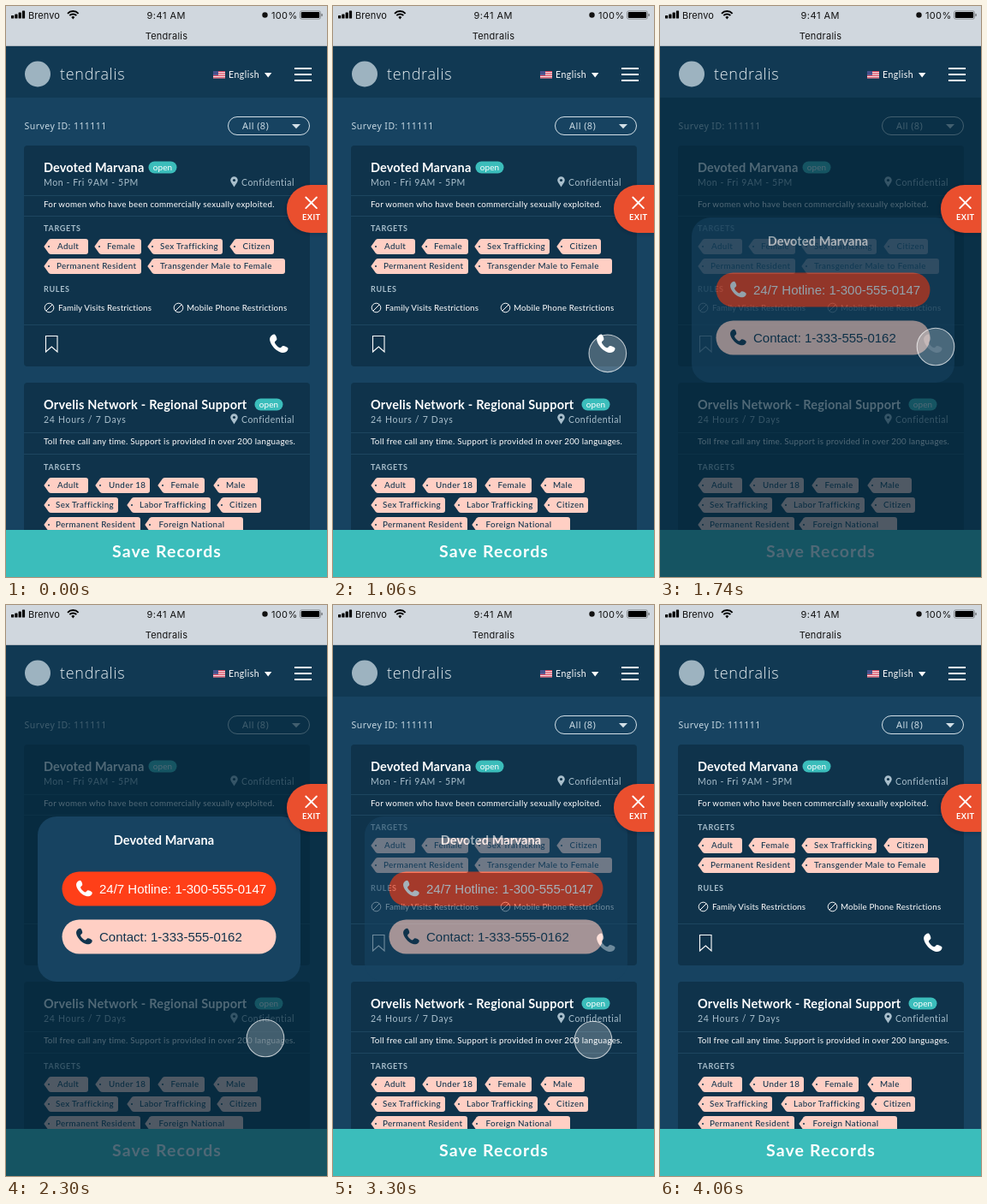
Animation, 375 px wide and 667 px high, one loop 4620 ms. Source, as an HTML page:

```html
<!DOCTYPE html>
<html lang="en">
<head>
<meta charset="utf-8">
<title>Survey results</title>
<style>
  html, body { margin: 0; width: 100%; height: 100%; overflow: hidden; background: #174361; }
  svg { display: block; width: 100vw; height: 100vh; }
  text { font-family: Lato, "Open Sans", sans-serif; white-space: pre; }
  .sys { font-family: Inter, Roboto, sans-serif; }
  .noto { font-family: "Noto Sans", "Open Sans", sans-serif; }
  .thin { font-family: "Open Sans", "Noto Sans", sans-serif; font-weight: 300; }
  .arial { font-family: "Liberation Sans", Arial, sans-serif; }
  .medium { font-weight: 500; }
  .bold { font-weight: 700; }
  .mid { text-anchor: middle; }
</style>
</head>
<body>
<svg id="stage" viewBox="0 0 375 667" xmlns="http://www.w3.org/2000/svg"></svg>
<script>
const LOOP = 4620;
const C = {
  page: '#174361', head: '#113953', card: '#0f334b', line: '#1d465f', navy: '#12344d', dim: '#05293c',
  teal: '#3bbdbb', tag: '#ffcfc4', red: '#ff3f18', exit: '#ea4f2e', soft: '#a9bfcc', bar: '#d0d7de'
};

// ---- drawing helpers ----
const text = (s, x, y, size, gap = 0, fill = '#fff', cls = '') =>
  `<text x="${x}" y="${y}" font-size="${size}" letter-spacing="${gap}" fill="${fill}" class="${cls}">${s}</text>`;
const rect = (x, y, w, h, fill, r = 0, more = '') =>
  `<rect x="${x}" y="${y}" width="${w}" height="${h}" rx="${r}" fill="${fill}" ${more}/>`;
const path = (d, fill, more = '') => `<path d="${d}" fill="${fill}" ${more}/>`;
const stroke = (d, color, w, more = '') =>
  path(d, 'none', `stroke="${color}" stroke-width="${w}" ${more}`);
const disc = (x, y, r, fill) => `<circle cx="${x}" cy="${y}" r="${r}" fill="${fill}"/>`;
const rule = y => rect(21, y, 334, 1, C.line);

const title = (s, x, y, gap, cls = '') => text(s, x, y, 14.5, gap, '#fff', 'bold ' + cls);
const label = (s, y) => text(s, 44, y, 9, 0.7, C.soft, 'bold');
const badge = (x, y) => rect(x - 0.5, y - 0.5, 33, 14, C.teal, 7) +
  text('open', x + 16, y + 9.6, 10, 0.1, '#fff', 'mid');

const tag = (s, x, right, textX, cy) =>
  path(`M${x - 0.7} ${cy}L${x + 4.8} ${cy - 7.8}Q${x + 5.8} ${cy - 9} ${x + 8} ${cy - 9}H${right - 3}q3 0 3 3v12q0 3-3 3` +
    `H${x + 8}Q${x + 5.8} ${cy + 9} ${x + 4.8} ${cy + 7.8}Z`, C.tag) +
  disc(x + 5, cy, 1, C.navy) + text(s, textX, cy + 3.4, 9.8, 0.36, C.navy, 'medium');

const phone = (x, y, k, fill) => path(
  'M1.2 4.2C2.6 1.6 5 .2 6.6 .6C8.4 1.6 9.8 5.6 9.4 7.2C9 8.6 6.8 9.2 6.8 10.6C7.4 13 11 16.8 13.6 17.4' +
  'C15 17.4 15.6 15.2 17 14.8C18.8 14.6 22.6 16.4 23.4 17.8C23.8 19.6 22.2 22 19.8 23' +
  'C15 24.6 8 20.4 4.6 15.6C1.4 11.4-.2 7 1.2 4.2Z', fill, `transform="translate(${x} ${y}) scale(${k})"`);

const place = y =>
  path(`M266.5 ${y + 6}C264 ${y + 2} 262.2 ${y} 262.2 ${y - 2}a4.3 4.3 0 0 1 8.6 0C270.8 ${y} 269 ${y + 2} 266.5 ${y + 6}Z`, C.soft) +
  disc(266.5, y - 2, 1.6, C.card) + text('Confidential', 275, y + 4.5, 10.5, 0.5, C.soft);

const banned = x => `<circle cx="${x}" cy="352.5" r="5.3" fill="none" stroke="#fff"/>` +
  stroke(`M${x - 3.6} 356.1l7.2-7.2`, '#fff', 1);

const callButton = (s, y, fill, ink) => rect(65.5, y, 250, 40, fill, 20) +
  phone(81.5, y + 9.7, 0.82, ink) + text(s, 109, y + 25.4, 15, 0, ink, 'arial');

// ---- parts of the screen ----
function statusBar() {
  const bars = [3.5, 5, 7, 9].map((h, i) => rect(6 + i * 4.3, 14.5 - h, 3.2, h, '#000', 0.6)).join('');
  const wifi = stroke('M72 8.8a8.6 8.6 0 0 1 12.6 0M74.3 11.2a5.4 5.4 0 0 1 8 0', '#000', 1.9) +
    path('M78.3 15.4l-2-2.3a2.8 2.8 0 0 1 4 0Z', '#000');
  const battery = rect(343.5, 5.8, 24, 9.4, 'none', 2, 'stroke="#000" stroke-opacity=".45" stroke-width=".7"') +
    rect(344.8, 7, 21.4, 7, '#000', 1) + rect(368.4, 9, 1.3, 3, '#000', 0.6, 'fill-opacity=".5"');
  return rect(0, 0, 375, 47, C.bar) + rect(0, 46.5, 375, 0.5, '#8d969e') + bars + wifi + battery +
    disc(302.5, 10.5, 3.2, '#111') +
    text('Brenvo', 26, 15, 11, 0.1, '#111', 'sys') +
    text('9:41 AM', 187.3, 15, 11, 0.5, '#111', 'sys mid') +
    text('100%', 310, 15, 11, 0.35, '#111', 'sys') +
    text('Tendralis', 187.5, 39, 11, 0.25, '#111', 'sys mid');
}

function header() {
  let flag = rect(242, 76, 14, 8.4, '#f3e9ec');
  for (let i = 0; i < 4; i++) flag += rect(242, 76 + i * 2.4, 14, 1.2, '#d9435a');
  flag += rect(242, 76, 6, 4.8, '#46508c');
  const menu = [73, 80, 87].map(y => rect(337, y - 1, 20, 2, '#fff')).join('');
  return rect(0, 47, 375, 60, C.head) + disc(37, 79.5, 15, '#9db3c0') +
    text('tendralis', 63, 86, 18, 0.7, '#e6eef2', 'thin') + flag +
    text('English', 260, 84, 10.5, 0.5) + path('M302 78h8.4l-4.2 5.4Z', '#fff') + menu;
}

function filters() {
  return text('Survey ID: 111111', 21.5, 144, 10.5, 0.45, '#c6d8e2', 'noto medium') +
    rect(259.5, 129.5, 95, 21, 'none', 10.5, 'stroke="#d3e0e7"') +
    text('All (8)', 276, 144, 11, 0.4, '#c9d9e2', 'noto') + path('M334 138h10l-5 5.2Z', '#d3e0e7');
}

function firstCard() {
  return rect(21, 163, 334, 258, C.card, 4) + rule(221) + rule(245) + rule(372) +
    title('Devoted Marvana', 44, 194, 0.12) + badge(167, 182) +
    text('Mon - Fri 9AM - 5PM', 44, 210, 10.5, 0.6, C.soft) + place(205.5) +
    text('For women who have been commercially sexually exploited.', 44, 235, 9.8, 0.25) +
    label('TARGETS', 263) +
    tag('Adult', 45, 96, 60, 281) + tag('Female', 104, 158, 118, 281) +
    tag('Sex Trafficking', 166, 253, 180, 281) + tag('Citizen', 262, 313, 276.5, 281) +
    tag('Permanent Resident', 45, 158, 59, 304) + tag('Transgender Male to Female', 166, 326, 180, 304) +
    label('RULES', 334) +
    banned(50.5) + text('Family Visits Restrictions', 61, 356, 9.8, 0.13) +
    banned(201.5) + text('Mobile Phone Restrictions', 211, 356, 9.8, 0.18) +
    stroke('M46.5 385.5h13.5v18.5l-6.7-6-6.8 6Z', '#fff', 1.1) + phone(307.5, 383, 0.94, '#fff');
}

function secondCard() {
  return rect(21, 440, 334, 240, C.card, 4) + rule(498) + rule(523) +
    title('Orvelis Network - Regional Support', 44, 471, 0.24) + badge(291, 459) +
    text('24 Hours / 7 Days', 44, 487, 10.5, 0.7, C.soft) + place(482.5) +
    text('Toll free call any time. Support is provided in over 200 languages.', 44, 512, 9.8, 0.25) +
    label('TARGETS', 542) +
    tag('Adult', 45, 96, 60, 560) + tag('Under 18', 105, 168, 120, 560) +
    tag('Female', 178, 232, 192.5, 560) + tag('Male', 243, 294, 257, 560) +
    tag('Sex Trafficking', 45, 131, 58, 583) + tag('Labor Trafficking', 142, 239, 156, 583) +
    tag('Citizen', 247, 298, 261, 583) +
    tag('Permanent Resident', 45, 157, 58, 606) + tag('Foreign National', 163, 277, 178.5, 606);
}

function dialog() {
  return rect(37, 247, 307, 193, C.page, 22) + title('Devoted Marvana', 184.5, 280, 0.12, 'mid') +
    callButton('24/7 Hotline: 1-300-555-0147', 311.5, C.red, '#fff') +
    callButton('Contact: 1-333-555-0162', 367.5, C.tag, C.navy);
}

function exitButton() {
  return path('M376 209H356a28 28 0 0 0 0 56H376Z', C.exit, 'filter="url(#shade)"') +
    stroke('M350.3 223.5l12.6 12.6m0-12.6l-12.6 12.6', '#fff', 1.9, 'stroke-linecap="round"') +
    text('EXIT', 346, 250, 9.3, 0.4, '#fff', 'bold');
}

const stage = document.getElementById('stage');
stage.innerHTML =
  `<defs><filter id="shade" x="-30%" y="-30%" width="160%" height="160%">
    <feDropShadow dx="0" dy="1" stdDeviation="2.5" flood-color="#04182a" flood-opacity=".3"/></filter></defs>` +
  rect(0, 0, 375, 667, C.page) + filters() + firstCard() + secondCard() +
  rect(0, 612, 375, 55, C.teal) + text('Save Records', 188, 644, 19.5, 1.1, '#fff', 'bold mid') +
  rect(0, 107, 375, 560, C.dim, 0, 'id="dim" fill-opacity=".7"') +
  statusBar() + header() +
  `<g id="dialog">${dialog()}</g>` + exitButton() +
  '<circle id="touch" r="21.8" fill="#fff" fill-opacity=".24" stroke="#fff" stroke-opacity=".7" stroke-width="1.1"/>';

const [dim, popup, touch] = ['dim', 'dialog', 'touch'].map(id => document.getElementById(id));

// ---- motion ----
const clamp = u => Math.min(1, Math.max(0, u));
const span = (t, a, b) => clamp((t - a) / (b - a));
const mix = (a, b, u) => a + (b - a) * u;

// Timing curve with control points (a, 0) and (b, 1).
function ease(u, a, b) {
  let lo = 0, hi = 1;
  for (let i = 0; i < 24; i++) {
    const s = (lo + hi) / 2, q = 1 - s;
    if (3 * q * q * s * a + 3 * q * s * s * b + s * s * s < u) lo = s; else hi = s;
  }
  return 3 * (1 - lo) * lo * lo + lo * lo * lo;
}

// Start time, end time, and the place reached: small drifts and the move to the lower card.
const moves = [
  [790, 890, 322, 417], [890, 1200, 320, 398], [1320, 1380, 322, 398],
  [2020, 2300, 303, 506], [2490, 2500, 303, 507.5], [2810, 3020, 304, 508]
];

function touchAt(t) {
  if (t < 800) {
    const s = ease(span(t, 235, 800), 0.35, 0.3), q = 1 - s;
    return [q * q * 347 + 2 * q * s * 276 + s * s * 324, mix(-26, 411, s)];
  }
  if (t >= 3500) {
    const s = ease(span(t, 3500, 4065), 0.25, 0.1);
    return [mix(303.5, 348, s ** 4), mix(508, -26, s)];
  }
  let x = 324, y = 411;
  for (const [a, b, nx, ny] of moves) {
    const s = ease(span(t, a, b), 0.42, 0.58);
    x = mix(x, nx, s);
    y = mix(y, ny, s);
  }
  return [x, y];
}

const dialogAlpha = t => span(t, 1565, 1880) - span(t, 3185, 3490);

function draw(t) {
  const [x, y] = touchAt(t), open = t >= 1580, alpha = open ? dialogAlpha(t) : 0;
  touch.setAttribute('cx', x.toFixed(2));
  touch.setAttribute('cy', y.toFixed(2));
  dim.style.display = open && t < 3200 ? '' : 'none';
  popup.style.display = alpha > 0 ? '' : 'none';
  popup.setAttribute('opacity', alpha.toFixed(3));
}

function tick() {
  draw(performance.now() % LOOP);
  requestAnimationFrame(tick);
}
tick();
</script>
</body>
</html>
```
